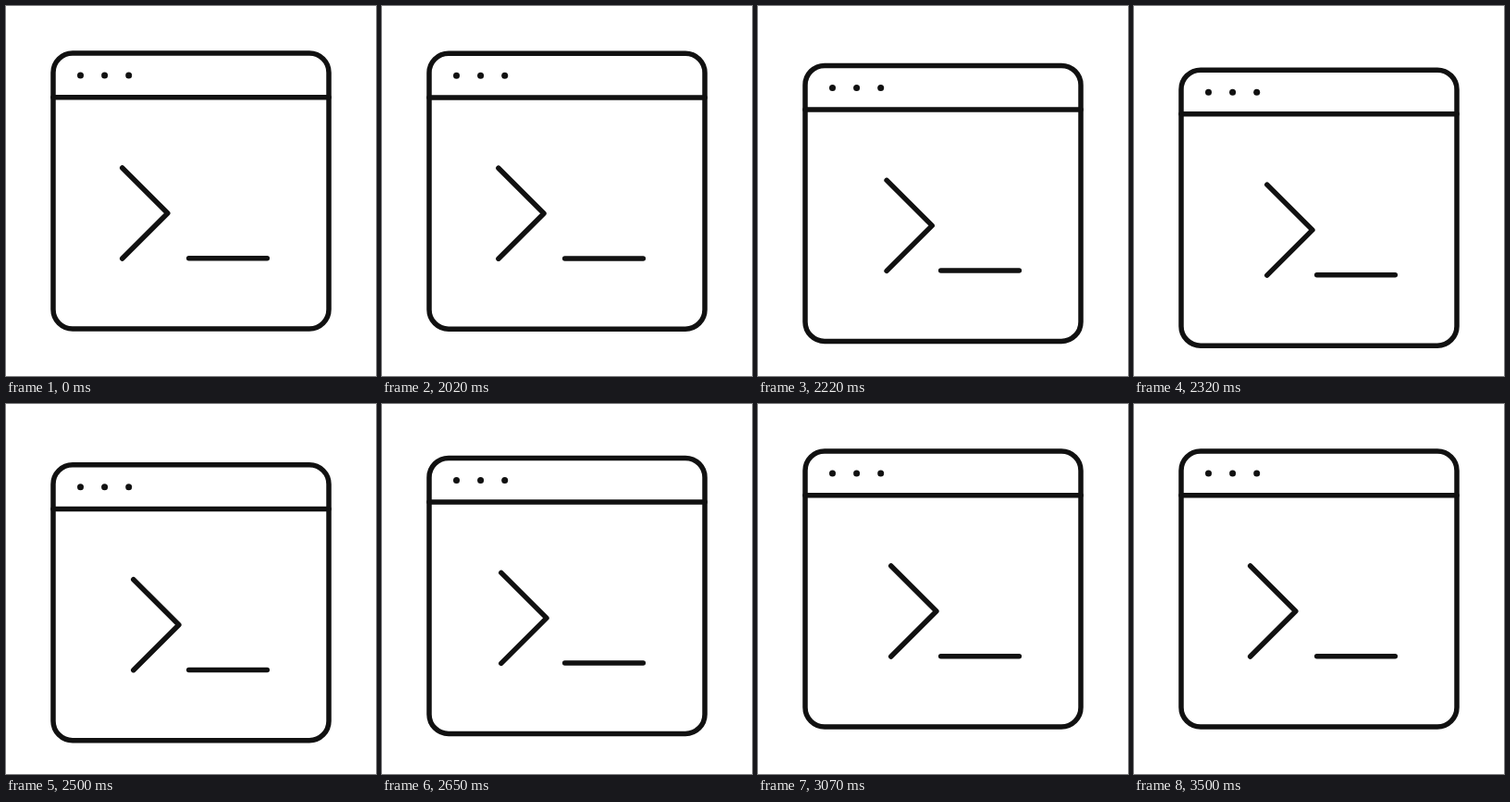
These frames come from a looping animation (400x400 px, 3.52 s). An HTML page:

```html
<!DOCTYPE html>
<html lang="en">
<head>
<meta charset="utf-8">
<title>Terminal icon</title>
<style>
  html, body { margin: 0; width: 100%; height: 100%; overflow: hidden; background: #fff; }
  svg { display: block; width: 100%; height: 100%; }
</style>
</head>
<body>
<svg viewBox="0 0 400 400">
  <g id="window" fill="none" stroke="#111" stroke-width="5.5" stroke-linecap="round" stroke-linejoin="round">
    <rect x="51" y="51" width="298" height="298" rx="21"/>
    <path d="M51 98.7H349M197.7 272.7H282.3"/>
    <path id="prompt" d="M125.7 175L174.8 224L125.7 273"/>
    <g fill="#111" stroke="none">
      <circle cx="80.5" cy="75" r="3.5"/>
      <circle cx="106.6" cy="75" r="3.5"/>
      <circle cx="132.7" cy="75" r="3.5"/>
    </g>
  </g>
</svg>
<script>
const LOOP = 3520, SHIFT = 18.2;
const frame = document.getElementById('window');
const prompt = document.getElementById('prompt');

const smooth = t => t * t * (3 - 2 * t);

// cubic-bezier(1/3, 0, 1/3, 1): quick start, long settle
function settle(p) {
  let lo = 0, hi = 1;
  for (let i = 0; i < 24; i++) {
    const t = (lo + hi) / 2;
    if (t * (1 - t) + t ** 3 < p) lo = t; else hi = t;
  }
  return smooth(lo);
}

// Rises from start to peak, then falls back to zero at end
function pulse(t, start, peak, end, fall = smooth) {
  if (t <= start || t >= end) return 0;
  return SHIFT * (t < peak
    ? smooth((t - start) / (peak - start))
    : 1 - fall((t - peak) / (end - peak)));
}

function draw(now) {
  const t = now % LOOP;
  const y = pulse(t, 2000, 2333, 3083, settle);
  const x = pulse(t, 2000, 2333, 2765) + pulse(t, 2765, 3085, 3500);
  frame.setAttribute('transform', `translate(0 ${y})`);
  prompt.setAttribute('transform', `translate(${x} 0)`);
}

const begin = performance.now();
function tick() {
  draw(performance.now() - begin);
  requestAnimationFrame(tick);
}
tick();
</script>
</body>
</html>
```
